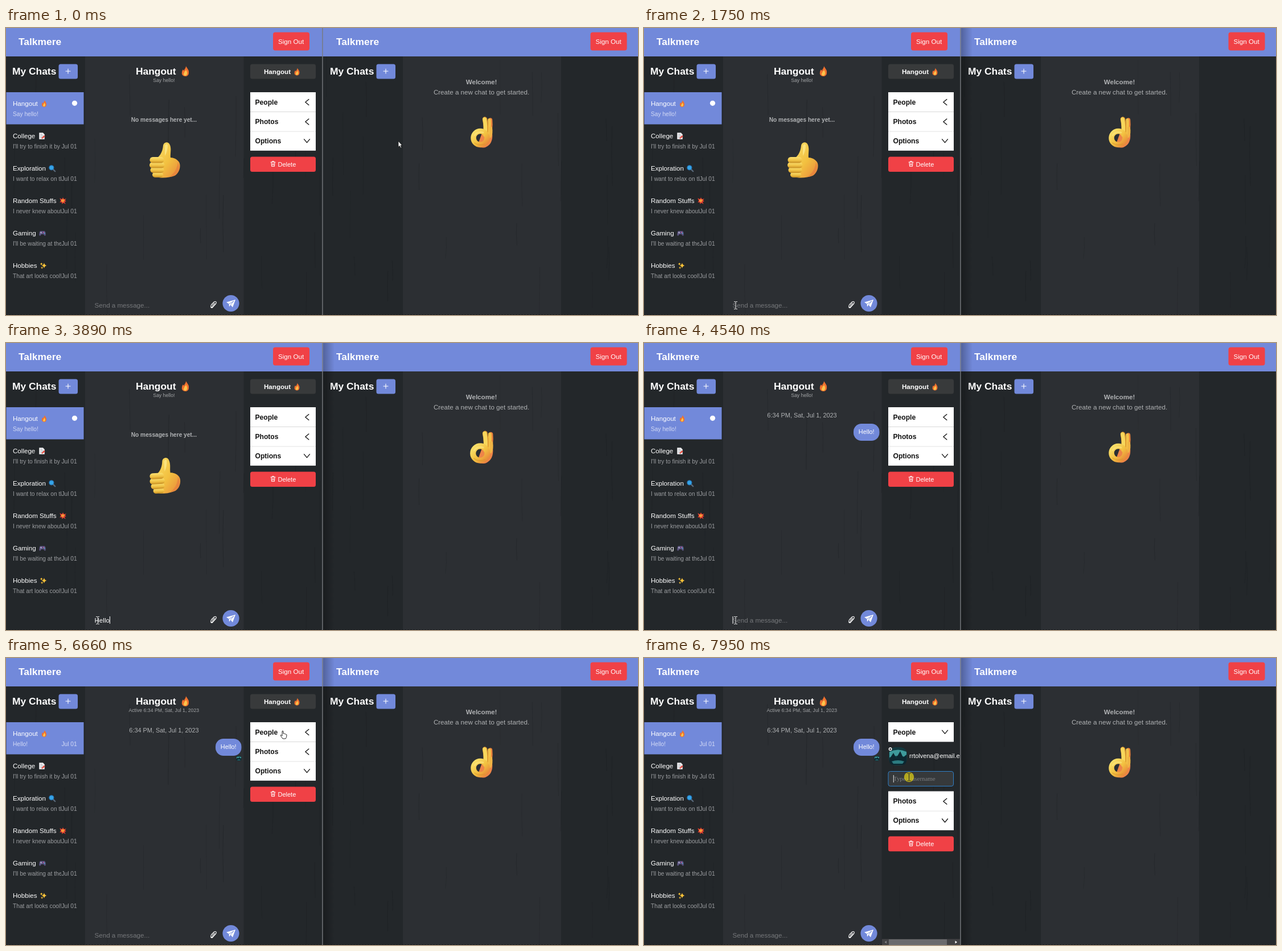
Write an HTML page that moves like this. It is 1110 px wide and 505 px high and loops after 8000 ms.

```html
<!DOCTYPE html>
<html lang="en">
<head>
<meta charset="utf-8">
<title>Chat</title>
<style>
html, body { margin: 0; width: 100%; height: 100%; overflow: hidden; background: #23272a; }
svg { display: block; }
text { font: 11.6px "Liberation Sans", Arial, sans-serif; fill: #fff; white-space: pre; }
.title { font-size: 17.4px; font-weight: bold; }
.bold { font-weight: bold; }
.row { font-size: 12.1px; font-weight: bold; fill: #111; }
.note { font-size: 10.2px; fill: #9b9da0; }
.active .note { fill: #d3daf5; }
.mid { text-anchor: middle; }
.soft { fill: #b0b2b4; }
.small { font-size: 8.7px; fill: #a2a4a6; }
.msg { font-size: 10.9px; }
.hint { fill: #76787b; }
.serif { font: 10.9px "Liberation Serif", Times, serif; fill: #7d7f82; }
.blue { fill: #7289da; }
.red { fill: #f04146; }
.line { fill: none; stroke: #fff; stroke-width: 1.1; stroke-linecap: round; stroke-linejoin: round; }
.chev { fill: none; stroke: #111; stroke-width: 1.3; stroke-linecap: round; stroke-linejoin: round; }
</style>
</head>
<body>
<svg id="stage" width="1110" height="505" viewBox="0 0 1110 505">
  <defs>
    <linearGradient id="skin" x1="0" y1="0" x2="1" y2="1">
      <stop offset="0" stop-color="#fbe26c"/><stop offset=".55" stop-color="#f2c040"/><stop offset="1" stop-color="#e8863a"/>
    </linearGradient>
    <linearGradient id="finger" x1="0" y1="0" x2="0" y2="1">
      <stop offset="0" stop-color="#fbe070"/><stop offset=".6" stop-color="#efc043"/><stop offset="1" stop-color="#c58c22"/>
    </linearGradient>
    <linearGradient id="edge" x1="0" y1="0" x2="1" y2="0">
      <stop offset="0" stop-opacity=".28"/><stop offset="1" stop-opacity="0"/>
    </linearGradient>
    <clipPath id="preview"><path d="M0 100H97V460H0Z"/></clipPath>
    <clipPath id="column"><path d="M418 50H555V505H418Z"/></clipPath>
    <clipPath id="drawer"><rect id="drawerBox" x="418" y="148" width="137" height="0"/></clipPath>

    <g id="flame">
      <path d="M1-9C3-5 7-2 6 3C6 7 3 9 0 9C-4 9-7 6-6 2C-6 0-5-2-4-3Q-3-1-2-1C-2-4 1-5 1-9Z" fill="#f0702e"/>
      <path d="M1-3C2 0 4 2 3 5C2 9-3 9-3 5C-3 3-1 2-1 0Q1 0 1-3Z" fill="#fbc54c"/>
    </g>
    <g id="memo">
      <path d="M-5-6H2L5-3V6H-5Z" fill="#f1f1f3"/>
      <path d="M-3-3H1M-3 0H3M-3 3H0" stroke="#9aa0aa"/>
      <path d="M-1 4L4-1L6 1L1 5Z" fill="#e5493c"/>
    </g>
    <g id="lens">
      <path d="M2 2L5.500 5.500" stroke="#596a7b" stroke-width="2.400" stroke-linecap="round"/>
      <circle cx="-1.200" cy="-1.200" r="4.200" fill="#36a5e8" stroke="#2374b5" stroke-width="1.300"/>
    </g>
    <g id="boom">
      <path d="M-6-5L-2-3L0-6L2-3L6-4L4-1L6 1L3 2L5 6L1 4L-2 6L-2 3L-6 3L-4 0Z" fill="#e23f31"/>
      <path d="M-3-2L0-3L3-2L2 1L0 3L-3 1Z" fill="#f49a38"/>
    </g>
    <g id="pad">
      <path d="M-4-4H4Q6-3 6 4Q4 6 2 2H-2Q-4 6-6 4Q-6-3-4-4Z" fill="#5b5480"/>
      <path d="M-4-1H-1M-2.500-2.500V.5" stroke="#c4c2d8"/>
      <circle cx="2" cy="-1.500" r="1" fill="#e4589b"/><circle cx="4" cy="0" r="1" fill="#4fb1d8"/>
    </g>
    <path id="star" d="M0-5Q.8-.8 5 0Q.8.8 0 5Q-.8.8-5 0Q-.8-.8 0-5Z" fill="#fbc338"/>
    <g id="spark">
      <use href="#star" x="1" y="0"/><use href="#star" transform="translate(-4 -3) scale(.5)"/><use href="#star" transform="translate(-3 4) scale(.45)"/>
    </g>
    <g id="bar">
      <text class="title" x="22" y="30">Talkmere</text>
      <text class="title" x="11" y="82">My Chats</text>
      <rect class="blue" x="92.500" y="63.500" width="33.500" height="26" rx="3.500"/>
      <path class="line" d="M105 76H113M109 72V80"/>
    </g>
    <g id="out">
      <rect class="red" x="469" y="7.500" width="64" height="32" rx="4"/>
      <text x="478" y="27.500">Sign Out</text>
    </g>
    <g id="lake">
      <rect x="-16" y="-16" width="32" height="32" rx="12" fill="#12393f"/>
      <path d="M-15-8Q0-15 15-8V2Q0-4-15 2Z" fill="#3e9a9b"/>
      <path d="M-15 5L-8-6L-3 3L4-9L9 2L15-3V9Q13 15 8 15H-8Q-14 15-15 9Z" fill="#0d2730"/>
      <path d="M-11 9Q0 5 11 9L8 13H-8Z" fill="#2c7b80"/>
    </g>
    <path id="chev" class="chev" d="M3.300-5L-2.700 0L3.300 5"/>
  </defs>

  <rect width="1110" height="505" fill="#23272a"/>
  <path d="M139 50H417.500V505H139ZM697 50H975V505H697Z" fill="#2c2f33"/>
  <g id="grain" fill="none" stroke="#15181b"></g>
  <path d="M0 504.500H1110" stroke="#17191b" stroke-dasharray="3 2"/>
  <rect class="blue" width="1110" height="50"/>
  <use href="#bar"/><use href="#bar" x="558"/>
  <use href="#out"/><use href="#out" x="557.500"/>
  <rect id="shade" x="557" width="20" height="505" fill="url(#edge)"/>
  <rect x="555.200" width="1.400" height="505" fill="#77797d"/>

  <g id="list"></g>
  <circle id="dot" cx="120.500" cy="132.300" r="4.600" fill="#fff"/>

  <text class="title" x="228" y="82">Hangout</text>
  <use href="#flame" x="315" y="76"/>
  <text id="status" class="small mid" x="277.300" y="94.500"></text>

  <g id="empty">
    <text class="bold mid soft" x="277.500" y="165" style="font-size:10.150px">No messages here yet...</text>
    <g id="thumb">
      <path d="M276 207C277 200 286 199 288 206C291 214 288 221 289 228C294 228 301 231 304 236C308 243 304 256 296 260C286 264 270 265 262 261C257 252 256 238 261 231C269 228 275 219 276 207Z" fill="url(#skin)"/>
      <path d="M302 236Q307 247 300 256Q295 261 287 262Q300 253 302 236Z" fill="#e7803e" opacity=".75"/>
      <path d="M279 207Q282 202 284 206Q284 217 279 225Z" fill="#fdec92" opacity=".7"/>
      <g fill="url(#finger)">
        <rect x="257" y="253.500" width="19" height="9.500" rx="4.700"/>
        <rect x="253.500" y="245" width="24" height="10" rx="5"/>
        <rect x="252" y="236" width="26.500" height="10.500" rx="5.200"/>
        <rect x="252.500" y="227" width="25" height="10.500" rx="5.200"/>
      </g>
    </g>
  </g>
  <g id="sent">
    <text class="msg mid soft" x="277.500" y="131">6:34 PM, Sat, Jul 1, 2023</text>
    <rect class="blue" x="368" y="142" width="45.500" height="30" rx="14"/>
    <text class="msg" x="376.800" y="160">Hello!</text>
  </g>
  <use id="seen" href="#lake" transform="translate(409 176.500) scale(.27)"/>

  <text id="hint" class="hint" x="155.500" y="492">Send a message...</text>
  <text id="draft" x="155.500" y="492"></text>
  <path id="caret" d="M0 481V494" stroke="#fff"/>
  <path class="line" d="M367.500 485L362.500 490.500Q360.500 492 359.700 490Q359.200 488.500 361 486.500L365.500 482Q367.500 480.500 369 482Q370 483.500 368.500 485.500L363 491.500Q361.500 493 359.800 491.500M366 484L362 488.500"/>
  <circle class="blue" cx="395" cy="484.500" r="14.600"/>
  <path d="M403 478L398 491.500L394.500 487L392 490.500L391.500 485.500L387 482.500Z" fill="#fff"/>
  <path d="M391.500 485.500L400 480.500L394.500 487" fill="none" stroke="#7289da" stroke-width=".9"/>

  <g clip-path="url(#column)">
    <rect x="429" y="63.500" width="115" height="26" rx="3.500" fill="#383a3b"/>
    <text class="bold" x="453" y="81">Hangout</text>
    <use href="#flame" transform="translate(511 77) scale(.72)"/>
    <rect x="429" y="113" width="115" height="34.500" fill="#fff"/>
    <text class="row" x="437.500" y="134.500">People</text>
    <g transform="translate(528.500 130.500)"><use id="turn" href="#chev"/></g>
    <g clip-path="url(#drawer)">
      <use href="#lake" x="446" y="173"/>
      <circle cx="432.600" cy="160.300" r="2.300" fill="#444" stroke="#fff" stroke-width="1.300"/>
      <text class="msg" x="466" y="176">rrtolvena@email.example</text>
      <rect id="field" x="429" y="199.500" width="114.500" height="26" rx="3.500" fill="#36393b"/>
      <text class="serif" x="438" y="216">Type a username</text>
      <path id="caret2" d="M438.300 206V219" stroke="#e8e8e8"/>
    </g>
    <g id="lower">
      <rect x="429" y="147.500" width="115" height="68.300" fill="#fff"/>
      <path d="M429 147.500H544M429 182H544" stroke="#dcdcdc" stroke-width=".8"/>
      <text class="row" x="437.500" y="168.500">Photos</text>
      <text class="row" x="437.500" y="203">Options</text>
      <use href="#chev" transform="translate(528.500 165)"/>
      <use href="#chev" transform="translate(528.500 199) rotate(-90)"/>
      <rect class="red" x="429" y="226.500" width="115" height="26.500" rx="3.500"/>
      <path class="line" d="M465 236H473M467.500 235.500V234.500H470.500V235.500M466 236.500L466.500 243.500H471.500L472 236.500M468 238.500V241.500M470 238.500V241.500" style="stroke-width:1"/>
      <text x="477.500" y="243.500" style="font-size:11px">Delete</text>
    </g>
    <g id="scroll">
      <rect x="418" y="494.500" width="137" height="10.500" fill="#424244"/>
      <rect x="430" y="495" width="102" height="10" fill="#6b6b6d"/>
      <path d="M426 497.500V502.500L422.500 500Z" fill="#818183"/><path d="M546.500 497.500V502.500L550 500Z" fill="#fff"/>
    </g>
  </g>

  <text class="bold mid soft" x="835" y="98.500">Welcome!</text>
  <text class="mid soft" x="835" y="117">Create a new chat to get started.</text>
  <g id="okay" fill="none" stroke-linecap="round">
    <path d="M836 185Q851 174 854 185Q856 204 842 210Q833 212 828 207Z" fill="#ee8548"/>
    <path d="M847 190Q852 177 850.500 162" stroke="#e8823c" stroke-width="7.500"/>
    <path d="M846 190Q850 177 849 162" stroke="#f3c148" stroke-width="5.500"/>
    <path d="M842 188Q844 174 841 160.500" stroke="#dd9830" stroke-width="8.500"/>
    <path d="M841.500 188Q843 174 840.500 160.500" stroke="#f7d75c" stroke-width="6.500"/>
    <path d="M850 191Q853 185 851.500 176" stroke="#f0b444" stroke-width="5"/>
    <ellipse cx="833" cy="193.500" rx="12" ry="12" stroke="url(#skin)" stroke-width="9.500"/>
    <path d="M823 189Q828 181 838 184" stroke="#fbe985" stroke-width="2.500" opacity=".6"/>
    <path d="M823 202Q830 208 841 204" stroke="#d69229" stroke-width="1.500" opacity=".6"/>
  </g>

  <circle id="pulse" fill="#ffeb10"/>
  <g id="cursor">
    <path id="arrow" d="M0 0V10.500L2.300 8.300L4 12L5.700 11.200L4.100 7.700H7Z" fill="#fff" stroke="#111" stroke-width=".8"/>
    <path id="beam" d="M-3-6.500H-1L0-5.800L1-6.500H3M0-5.800V5.800M-3 6.500H-1L0 5.800L1 6.500H3" fill="none" stroke="#ddd"/>
    <path id="hand" d="M-1 1Q0-1 1 1V5Q3 4 3.300 5.500Q5 5 5.400 6.500Q7 6 7 8Q7 12 5 14H0L-3.500 9Q-4 7-2.500 7.500L-1 9Z" fill="#fff" stroke="#111" stroke-width=".9"/>
  </g>
</svg>
<script>
const LOOP = 8000, SWAY = 1750;
const $ = id => document.getElementById(id);
const set = (id, name, value) => $(id).setAttribute(name, value);
const show = (id, on) => set(id, "visibility", on ? "visible" : "hidden");
const clamp = v => Math.max(0, Math.min(1, v));
const smooth = v => { v = clamp(v); return v * v * (3 - 2 * v); };

const chats = [
  ["Hangout", "Say hello!", "flame", 67],
  ["College", "I'll try to finish it by", "memo", 63],
  ["Exploration", "I want to relax on the", "lens", 81],
  ["Random Stuffs", "I never knew about", "boom", 100],
  ["Gaming", "I'll be waiting at the", "pad", 64],
  ["Hobbies", "That art looks cool!", "spark", 66]
];
$("list").innerHTML = chats.map(([name, text, icon, x], i) => {
  const y = 133 + i * 57;
  const scale = icon === "flame" ? .66 : .95;
  return `<g class="${i ? "" : "active"}">
    ${i ? "" : '<rect class="blue" x=".5" y="113" width="136" height="56.500"/>'}
    <text x="12" y="${y + 4}">${name}</text>
    <use href="#${icon}" transform="translate(${x} ${y}) scale(${scale})"/>
    <g clip-path="url(#preview)"><text class="note" id="note${i}" x="12" y="${y + 22.3}">${text}</text></g>
    <text class="note" id="date${i}" x="97.500" y="${y + 22.3}">Jul 01</text></g>`;
}).join("");

// Faint wood grain behind the panels
let seed = 11;
const rnd = () => (seed = seed * 16807 % 2147483647) / 2147483647;
let grain = "";
for (let i = 0; i < 56; i++) {
  const x = rnd() * 1110, y = 50 + rnd() * 380, len = 25 + rnd() * 90;
  grain += `<path d="M${x} ${y}q${rnd() * 4 - 2} ${len / 2} ${rnd() * 3 - 1.5} ${len}" opacity="${.1 + rnd() * .25}"/>`;
}
$("grain").innerHTML = grain;

const typing = [[0, ""], [2640, "H"], [2760, "Hi"], [2980, "H"], [3080, "He"], [3190, "Hel"],
  [3280, "Hell"], [3700, "Hello"], [3990, "Hello!"], [4245, ""]];
const route = [[0, 689, 199], [50, 689, 199], [330, 470, 19], [790, 158, 488], [1500, 158, 488],
  [1690, 161, 488], [5830, 161, 488], [6500, 486, 128], [7000, 486, 128], [7370, 465.5, 209.5], [LOOP, 465.5, 209.5]];
const clicks = [[1830, 161, 488], [6710, 486, 129], [7850, 465.5, 209.5]];

function place(t) {
  const i = route.findIndex(p => p[0] > t);
  const [t0, x0, y0] = route[i - 1], [t1, x1, y1] = route[i];
  const k = smooth((t - t0) / (t1 - t0));
  return [x0 + (x1 - x0) * k, y0 + (y1 - y0) * k];
}

function drawChat(t) {
  const [last, draft] = typing.filter(p => p[0] <= t).pop();
  const sent = t >= 4280, seen = t >= 5480;
  $("draft").textContent = draft;
  show("hint", !draft);
  show("empty", !sent);
  show("sent", sent);
  show("seen", seen);
  show("dot", !seen);
  show("date0", seen);
  $("note0").textContent = seen ? "Hello!" : "Say hello!";
  $("status").textContent = seen ? "Active 6:34 PM, Sat, Jul 1, 2023" : "Say hello!";
  const since = t - Math.max(last, 1860);
  show("caret", t >= 1860 && t < 6560 && since % 1060 < 530);
  set("caret", "transform", `translate(${156 + (draft ? $("draft").getComputedTextLength() : 0)} 0)`);
}

function drawPanel(t) {
  const open = smooth((t - 6760) / 210), focus = t >= 7870;
  set("lower", "transform", `translate(0 ${87.3 * open})`);
  set("drawerBox", "height", 87 * open);
  set("turn", "transform", `rotate(${-90 * open})`);
  set("field", "stroke", focus ? "#2f7fc8" : "#55585a");
  show("caret2", focus);
  show("scroll", t >= 6760);
}

function drawHands(t) {
  const a = t / SWAY * 2 * Math.PI;
  set("thumb", "transform", `rotate(${-4.3 * (1 - Math.cos(a))} 279 234) translate(0 ${1.2 * (1 - Math.cos(a))})`);
  const up = Math.max(0, Math.sin(a));
  set("okay", "transform", `translate(835.5 184) scale(${1 + .06 * up * up}) translate(-835.5 -184)`);
}

function drawCursor(t) {
  const [x, y] = place(t);
  set("cursor", "transform", `translate(${x} ${y})`);
  const inField = x > 428 && x < 544 && y > 199 && y < 226 && t > 7000;
  const beam = inField || (x < 355 && y > 474);
  const hand = !beam && x > 428 && x < 544 && y > 112 && y < 148 && t > 6000;
  show("beam", beam);
  show("hand", hand);
  show("arrow", !beam && !hand);
  const hit = clicks.find(c => t >= c[0] && t < c[0] + 420);
  show("pulse", hit);
  if (hit) {
    const age = t - hit[0];
    set("pulse", "cx", hit[1]);
    set("pulse", "cy", hit[2]);
    set("pulse", "r", 6 + 4 * clamp(age / 150));
    set("pulse", "opacity", .62 * (1 - clamp((age - 180) / 240)));
  }
  set("beam", "stroke", hit ? "#222" : "#ddd");
  show("shade", t >= 560);
}

function frame() {
  const t = performance.now() % LOOP;
  drawChat(t);
  drawPanel(t);
  drawHands(t);
  drawCursor(t);
  requestAnimationFrame(frame);
}
frame();
</script>
</body>
</html>
```
